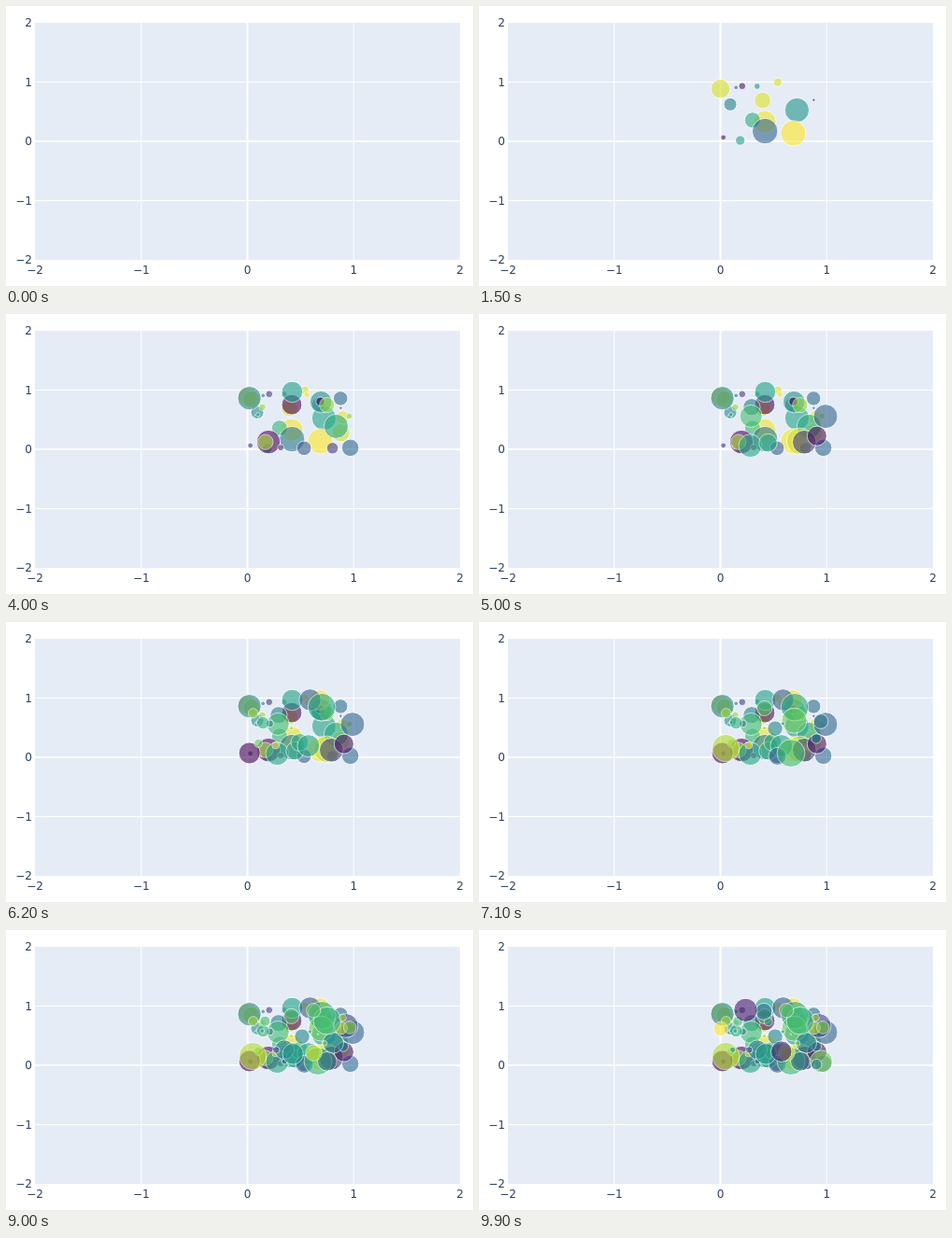
An HTML page that plays this animation: 500x300 px, repeating every 10 s.

```html
<!DOCTYPE html>
<html lang="en">
<head>
<meta charset="utf-8">
<title>Growing bubble chart</title>
<style>
html, body { margin: 0; width: 100%; height: 100%; overflow: hidden; background: #fff; }
svg { display: block; }
text { font: 12px "DejaVu Sans", Verdana, sans-serif; fill: #2a3f5f; }
</style>
</head>
<body>
<svg id="chart" width="500" height="300" viewBox="0 0 500 300">
  <rect x="31" y="18" width="455" height="254" fill="#e5ecf6"/>
</svg>
<script>
const COUNT = 100, STEP = 100;
const VIRIDIS = ['440154', '482878', '3e4989', '31688e', '26828e',
                 '1f9e89', '35b779', '6ece58', 'b5de2b', 'fde725']
  .map(hex => [0, 2, 4].map(i => parseInt(hex.substr(i, 2), 16)));

const chart = document.getElementById('chart');
const px = x => 258.5 + x * 113.75;
const py = y => 145 - y * 63.5;

function add(tag, attrs, text = '') {
  const el = document.createElementNS('http://www.w3.org/2000/svg', tag);
  for (const key in attrs) el.setAttribute(key, attrs[key]);
  el.textContent = text;
  return chart.appendChild(el);
}

// Mersenne Twister giving 53-bit floats in [0, 1)
function twister(seed) {
  const s = new Uint32Array(624);
  let k = 0;
  s[0] = seed;
  for (let i = 1; i < 624; i++) s[i] = Math.imul(1812433253, s[i - 1] ^ s[i - 1] >>> 30) + i;
  const next = () => {
    let y = s[k] & 0x80000000 | s[(k + 1) % 624] & 0x7fffffff;
    s[k] = s[(k + 397) % 624] ^ y >>> 1 ^ (y & 1 ? 0x9908b0df : 0);
    y = s[k];
    k = (k + 1) % 624;
    y ^= y >>> 11;
    y ^= y << 7 & 0x9d2c5680;
    y ^= y << 15 & 0xefc60000;
    return (y ^ y >>> 18) >>> 0;
  };
  return () => {
    const high = next() >>> 5, low = next() >>> 6;
    return (high * 67108864 + low) / 9007199254740992;
  };
}

function viridis(v) {
  const pos = v * 9, i = Math.min(8, Math.floor(pos));
  const rgb = VIRIDIS[i].map((c, j) => Math.round(c + (VIRIDIS[i + 1][j] - c) * (pos - i)));
  return `rgb(${rgb})`;
}

// Grid, with thicker zero lines on top
for (const v of [-1, 1, 0]) {
  const line = { stroke: '#fff', 'stroke-width': v ? 1 : 2 };
  add('line', { ...line, x1: px(v), x2: px(v), y1: 18, y2: 272 });
  add('line', { ...line, x1: 31, x2: 486, y1: py(v), y2: py(v) });
}
for (let v = -2; v <= 2; v++) {
  const label = String(v).replace('-', '\u2212');
  add('text', { x: px(v), y: 287, 'text-anchor': 'middle' }, label);
  add('text', { x: 28, y: py(v) + 4.2, 'text-anchor': 'end' }, label);
}

const random = twister(1);
const [xs, ys, shades, sizes] = Array.from({ length: 4 }, () => Array.from({ length: COUNT }, random));
const bubbles = xs.map((x, i) => add('circle', {
  cx: px(x), cy: py(ys[i]), r: sizes[i] * 15, stroke: '#fff', opacity: 0.6
}));

// The colour scale always spans the bubbles on show
function show(n) {
  const visible = shades.slice(0, n);
  let min = Math.min(...visible), max = Math.max(...visible);
  if (min === max) { min -= 0.5; max += 0.5; }
  bubbles.forEach((bubble, i) => {
    bubble.style.display = i < n ? '' : 'none';
    if (i < n) bubble.setAttribute('fill', viridis((shades[i] - min) / (max - min)));
  });
}

let shown = 0;
show(0);
const start = performance.now();
function tick() {
  const n = Math.floor(Math.max(0, performance.now() - start) / STEP) % COUNT;
  if (n !== shown) show(shown = n);
  requestAnimationFrame(tick);
}
tick();
</script>
</body>
</html>
```
